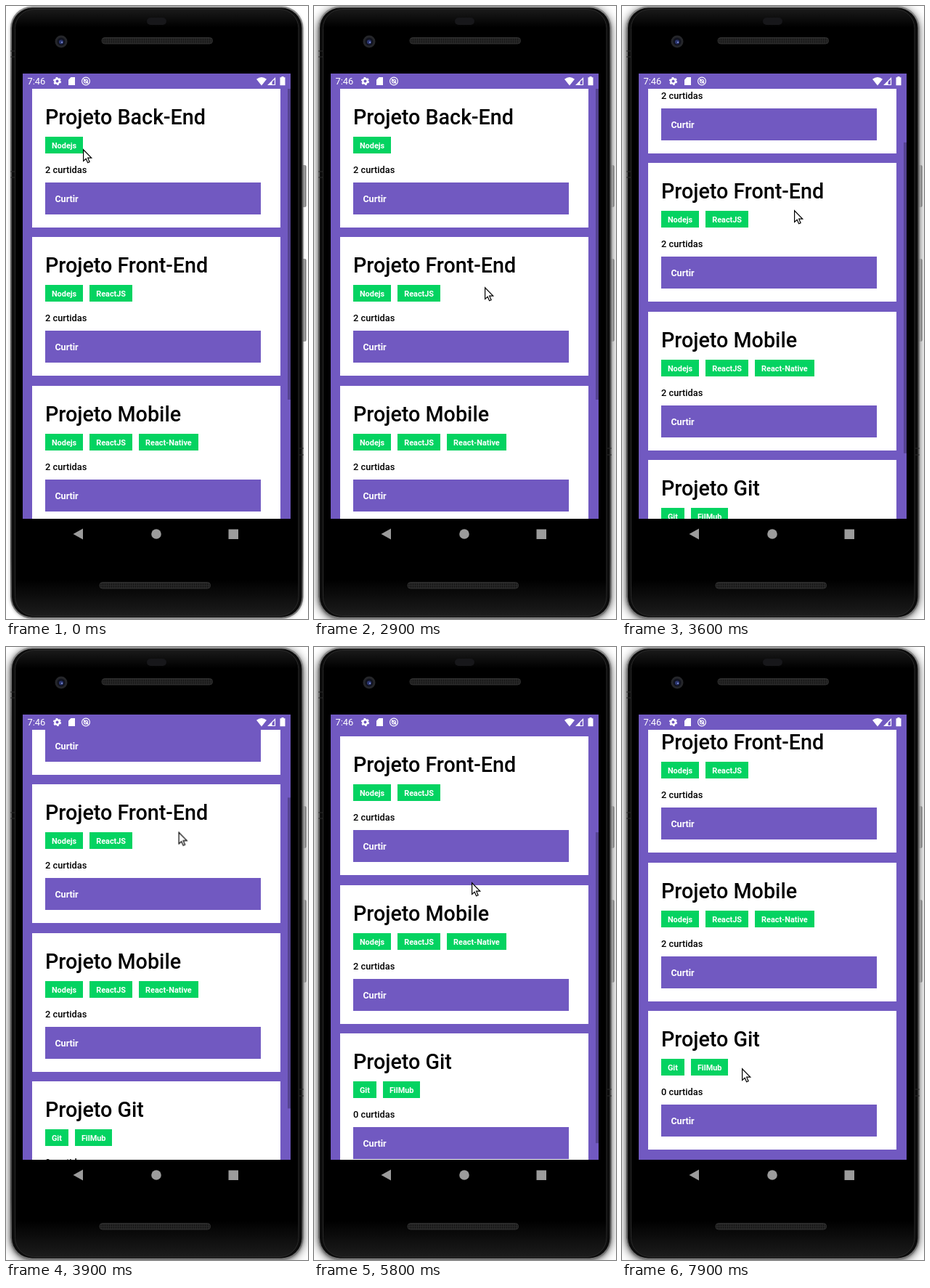
Animation of 416 by 844 pixels, one loop 8 s. Source, as an HTML page:

```html
<!DOCTYPE html>
<html lang="pt">
<head>
<meta charset="utf-8">
<title>Projetos</title>
<style>
@property --scroll { syntax: "<number>"; inherits: true; initial-value: 0; }

html, body { margin: 0; width: 100%; height: 100%; overflow: hidden; background: #fff; }
.stage { position: relative; width: 416px; height: 844px; overflow: hidden; font-family: Roboto, sans-serif; }
.stage > * { position: absolute; }
.frame { left: 0; top: 0; }

.shadow { left: 6px; top: 1px; width: 403px; height: 842px; border-radius: 30px; box-shadow: 0 1px 4px rgba(0,0,0,.35); }
.shadow.focus { box-shadow: 0 2px 13px rgba(0,0,0,.65); animation: focus 8s step-end infinite; }

.screen { left: 23px; top: 93px; width: 369px; height: 613px; background: #7159c1; }
.time { position: absolute; left: 6.5px; top: 3px; font-size: 12.9px; line-height: 16px; color: #fff; }

.view { left: 23px; top: 114px; width: 369px; height: 592px; overflow: hidden; animation: scroll 8s step-end infinite; }
.list { transform: translateY(calc(var(--scroll) * -1px)); }
.bar {
  position: absolute; right: 0; top: 0; width: 4px; height: 428.4px; background: rgba(0,0,0,.25);
  transform: translateY(calc(var(--scroll) * .7237px)); animation: fade 8s step-end infinite;
}

article { position: relative; width: 342px; height: 191px; margin: 0 0 13px 13px; background: #fff; font-weight: 700; color: #000; }
article:nth-child(2) { margin-bottom: 14px; }
article > * { position: absolute; left: 18px; margin: 0; white-space: nowrap; }
h2 { top: 20px; font-size: 28.7px; font-weight: 500; line-height: 38px; }
.tags { left: 17.9px; top: 66px; display: flex; gap: 9px; }
.tags span { padding: 2px 9px 0; background: #04d361; color: #fff; font-size: 10.9px; line-height: 21px; }
p { top: 104px; font-size: 12.8px; font-weight: 500; line-height: 15px; }
.like { top: 129px; width: 283.6px; padding: 1px 0 0 13.4px; background: #7159c1; color: #fff; font-size: 12.56px; line-height: 43px; }

.cursor { left: 0; top: 0; overflow: visible; animation: move 8s step-end infinite; }

@keyframes focus { 0% { opacity: 0 } 35%, 100% { opacity: 1 } }

@keyframes scroll {
  0%     { --scroll: 0 }
  36.25% { --scroll: 0; animation-timing-function: steps(3) }
  40%    { --scroll: 43; animation-timing-function: steps(4) }
  45%    { --scroll: 102; animation-timing-function: steps(6) }
  52.5%  { --scroll: 156 }
  67.5%  { --scroll: 156; animation-timing-function: steps(4) }
  72.5%  { --scroll: 195 }
  73.75% { --scroll: 195; animation-timing-function: steps(2) }
  76.25%, 100% { --scroll: 226 }
}

@keyframes fade {
  0%     { opacity: 1 }
  7.5%   { opacity: 1; animation-timing-function: steps(4) }
  12.5%  { opacity: 0 }
  36.25% { opacity: 1 }
  55%    { opacity: 1; animation-timing-function: steps(3) }
  58.75% { opacity: 0 }
  68.75% { opacity: 1 }
  81.25% { opacity: 1; animation-timing-function: steps(3) }
  85%    { opacity: .1 }
  87.5%, 100% { opacity: 0 }
}

@keyframes move {
  0%     { transform: translate(106px, 197px) }
  7.5%   { transform: translate(106px, 197px); animation-timing-function: steps(9) }
  18.75% { transform: translate(256px, 288px); animation-timing-function: steps(2) }
  21.25% { transform: translate(257px, 334px); animation-timing-function: steps(7) }
  30%    { transform: translate(235px, 402px) }
  33.75% { transform: translate(235px, 402px); animation-timing-function: steps(2) }
  36.25% { transform: translate(235px, 387px); animation-timing-function: steps(3) }
  40%    { transform: translate(236px, 343px); animation-timing-function: steps(4) }
  45%    { transform: translate(237px, 281px); animation-timing-function: steps(6) }
  52.5%  { transform: translate(238px, 228px) }
  53.75% { transform: translate(238px, 228px); animation-timing-function: steps(5) }
  60%    { transform: translate(228px, 339px); animation-timing-function: steps(4) }
  65%    { transform: translate(220px, 373px) }
  66.25% { transform: translate(220px, 373px); animation-timing-function: steps(1) }
  67.5%  { transform: translate(219px, 363px); animation-timing-function: steps(4) }
  72.5%  { transform: translate(217px, 324px) }
  73.75% { transform: translate(217px, 324px); animation-timing-function: steps(4) }
  78.75% { transform: translate(225px, 245px) }
  81.25% { transform: translate(225px, 245px); animation-timing-function: steps(3) }
  85%    { transform: translate(228px, 249px) }
  86.25% { transform: translate(228px, 249px); animation-timing-function: steps(9) }
  97.5%  { transform: translate(168px, 554px) }
  98.75%, 100% { transform: translate(165px, 580px) }
}
</style>
</head>
<body>
<div class="stage">
  <div class="shadow"></div>
  <div class="shadow focus"></div>

  <svg class="frame" width="416" height="844">
    <defs>
      <linearGradient id="rim" x2="0" y2="1">
        <stop offset="0" stop-color="#888"/>
        <stop offset=".12" stop-color="#666"/>
        <stop offset=".9" stop-color="#4a4a4a"/>
        <stop offset="1" stop-color="#777"/>
      </linearGradient>
      <linearGradient id="face" x2="0" y2="1">
        <stop offset="0" stop-color="#1a1a1a"/>
        <stop offset=".03" stop-color="#000"/>
        <stop offset=".94" stop-color="#000"/>
        <stop offset="1" stop-color="#1c1c1c"/>
      </linearGradient>
      <linearGradient id="key">
        <stop offset="0" stop-color="#444"/>
        <stop offset=".6" stop-color="#aaa"/>
        <stop offset="1" stop-color="#666"/>
      </linearGradient>
      <pattern id="mesh" width="3" height="3" patternUnits="userSpaceOnUse">
        <rect width="3" height="3" fill="#282828"/>
        <circle cx="1.5" cy="1.5" r=".9" fill="#111"/>
      </pattern>
    </defs>
    <g fill="url(#key)">
      <rect x="407" y="219" width="6.5" height="58" rx="2"/>
      <rect x="407" y="348" width="6.5" height="114" rx="2"/>
    </g>
    <rect x="6" y=".5" width="403.5" height="843" rx="30" fill="url(#rim)"/>
    <rect x="8" y="2.5" width="399.5" height="839" rx="28" fill="#0c0c0c"/>
    <rect x="12.5" y="4.5" width="390.5" height="835" rx="26" fill="url(#face)" stroke="#2a2a2a"/>
    <path d="M6 62h6M6 70h6M6 228h6M6 236h6M404 609h6M404 618h6" stroke="#2a2a2a"/>
    <rect x="194" y="16" width="27" height="10" rx="5" fill="#17171a"/>
    <circle cx="76" cy="49" r="8.5" fill="#25262a"/>
    <circle cx="76" cy="49" r="5.5" fill="#11131f"/>
    <circle cx="76" cy="49.5" r="3" fill="#2a3570"/>
    <circle cx="77" cy="50" r="1.1" fill="#8796d8"/>
    <g fill="url(#mesh)" stroke="#303030">
      <rect x="132" y="43.5" width="152.5" height="8.5" rx="4"/>
      <rect x="129" y="793.5" width="152.5" height="8.5" rx="4"/>
    </g>
    <g fill="#9c9c9c">
      <path d="M92.5 727l13.5-7.500v15z"/>
      <circle cx="207" cy="727" r="6.8"/>
      <rect x="306.5" y="720.5" width="13.5" height="13.5"/>
    </g>
  </svg>

  <div class="screen">
    <span class="time">7:46</span>
  </div>

  <svg class="frame" width="416" height="114" fill="#fff">
    <g fill="none" stroke="#fff">
      <circle cx="70.5" cy="103.5" r="3.2" stroke-width="2.4"/>
      <circle cx="70.5" cy="103.5" r="4.7" stroke-width="1.8" stroke-dasharray="2.6 2.32"/>
      <circle cx="110" cy="103.5" r="5.4" stroke-width="1.2"/>
      <circle cx="110" cy="103.5" r="2.5" stroke-width="1.2"/>
      <path d="M107 100.5l6 6" stroke-width="1.2"/>
    </g>
    <path d="M89.500 98h5.500v11h-9v-7.500z"/>
    <path d="M345 100.700q7-5.400 14 0l-7 8.800z"/>
    <path d="M361.500 108.500l9-9v9z" fill="none" stroke="#fff" stroke-width="1.2"/>
    <path d="M361 109l5.500-5.500v5.500z"/>
    <path d="M379.500 97h3v1.300h2v11h-7v-11h2z"/>
  </svg>

  <div class="view">
    <div class="list">
      <article>
        <h2>Projeto Back-End</h2>
        <div class="tags"><span>Nodejs</span></div>
        <p>2 curtidas</p>
        <div class="like">Curtir</div>
      </article>
      <article>
        <h2>Projeto Front-End</h2>
        <div class="tags"><span>Nodejs</span><span>ReactJS</span></div>
        <p>2 curtidas</p>
        <div class="like">Curtir</div>
      </article>
      <article>
        <h2>Projeto Mobile</h2>
        <div class="tags"><span>Nodejs</span><span>ReactJS</span><span>React-Native</span></div>
        <p>2 curtidas</p>
        <div class="like">Curtir</div>
      </article>
      <article>
        <h2>Projeto Git</h2>
        <div class="tags"><span>Git</span><span>FilMub</span></div>
        <p>0 curtidas</p>
        <div class="like">Curtir</div>
      </article>
    </div>
    <div class="bar"></div>
  </div>

  <svg class="cursor" width="13" height="20">
    <path d="M.6.8v15.700l3.600-3.300 2.400 5.600 2.500-1.100-2.400-5.500h5z" fill="#fff" stroke="#000" stroke-width="1.2"/>
  </svg>
</div>
</body>
</html>
```
